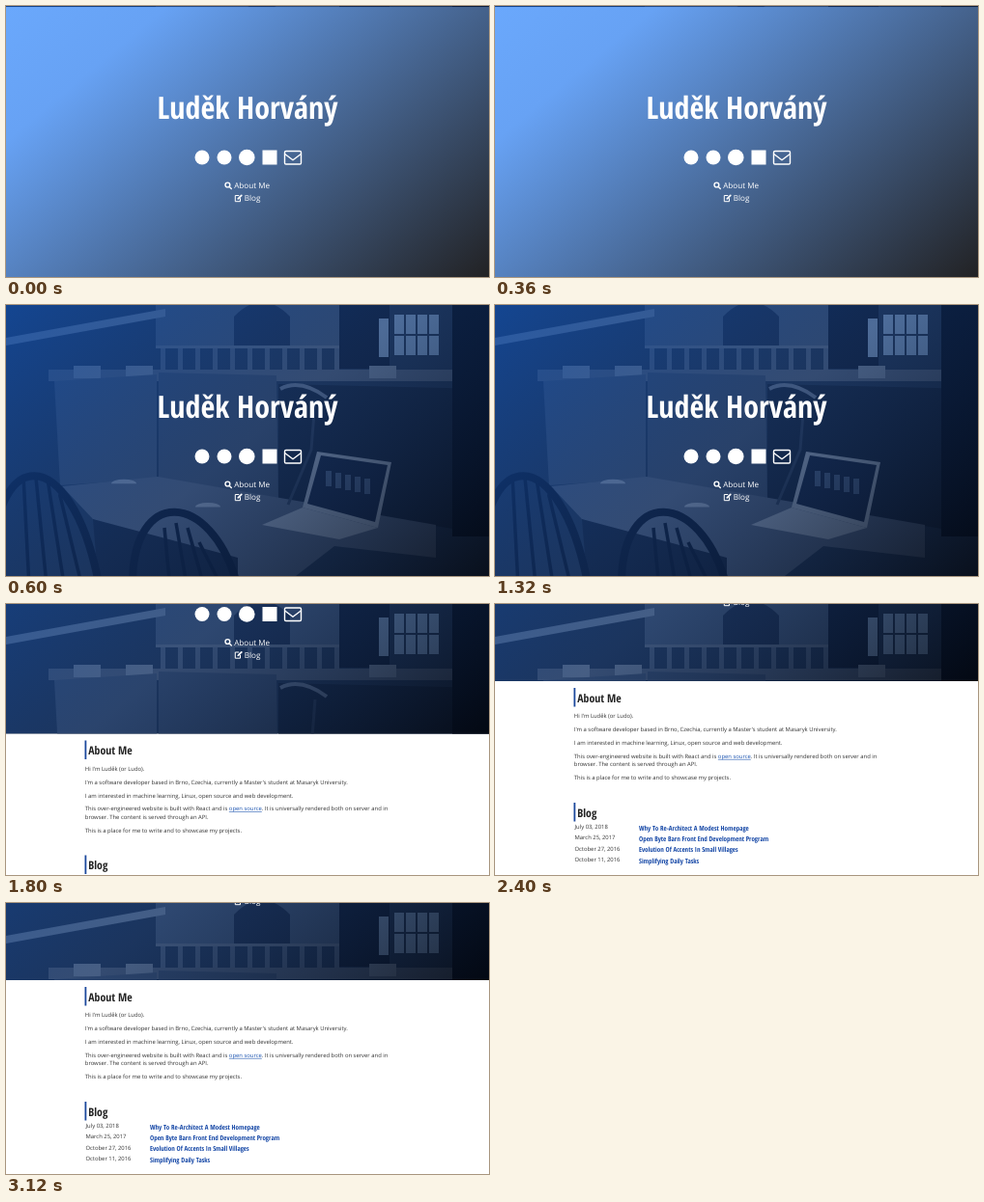
Animation, 500 px wide and 281 px high, one loop 3.6 s. Source, as an HTML page with a canvas:

```html
<!DOCTYPE html>
<html lang="en">
<head>
<meta charset="utf-8">
<title>Personal page</title>
<style>
  html, body { margin: 0; width: 100%; height: 100%; overflow: hidden; background: #fff; }
  canvas, svg { position: absolute; left: 0; top: 0; width: 100%; height: 100%; display: block; }
  text { font-family: "Open Sans", sans-serif; text-rendering: geometricPrecision; white-space: pre; }
  .cond { font-family: "Open Sans Condensed", "Open Sans", sans-serif; font-stretch: 75%; font-weight: 700; }
  .name { font-size: 32px; fill: #fff; text-anchor: middle; }
  .nav { font-size: 8.15px; fill: #fff; }
  .head { font-size: 11.8px; fill: #222; }
  .body { font-size: 5.88px; fill: #333; }
  .post { font-size: 7px; fill: #1547a6; }
  .link { fill: #1d55b0; text-decoration: underline; }
  .line { fill: none; stroke: #fff; stroke-width: 1.4; stroke-linejoin: round; stroke-linecap: round; }
</style>
</head>
<body>
<canvas id="view" width="500" height="281"></canvas>
<svg viewBox="0 0 500 281" preserveAspectRatio="none">
  <g id="page">
    <text class="cond name" x="250" y="116.5">Luděk Horváný</text>
    <g fill="#fff">
      <circle cx="203" cy="157" r="7.5"/>
      <circle cx="226" cy="157" r="7.5"/>
      <circle cx="249.3" cy="157" r="8.3"/>
      <rect x="265.5" y="149.5" width="15" height="15"/>
    </g>
    <g class="line">
      <rect x="288.500" y="150.500" width="17" height="13.500" rx="1.300"/>
      <path d="M288.700 153.500l8.300 6.200 8.300 -6.200"/>
      <circle cx="229.400" cy="185.500" r="2.400"/>
      <path d="M231.300 187.400l2 2"/>
      <path stroke-width="1" d="M242.500 199.600v3.100h-5.200v-6.200h3.500"/>
      <path stroke-width="1.700" d="M240.300 199.800l3.500 -3.500"/>
    </g>
    <text class="nav" x="236.200" y="189">About Me</text>
    <text class="nav" x="246.800" y="202">Blog</text>
  </g>
</svg>
<script>
const W = 500, H = 281, LOOP = 3600;
const ctx = document.getElementById('view').getContext('2d');
const page = document.getElementById('page');

// Text below the hero

function add(tag, attrs, str = '', parent = page) {
  const el = document.createElementNS('http://www.w3.org/2000/svg', tag);
  for (const key in attrs) el.setAttribute(key, attrs[key]);
  el.textContent = str;
  parent.append(el);
  return el;
}
function section(y, title) {
  add('rect', { x: 81.5, y: y - 14.5, width: 1.8, height: 19.5, fill: '#1b489c' });
  add('text', { class: 'cond head', x: 85.3, y }, title);
}

const about = [
  "Hi I'm Luděk (or Ludo).",
  "I'm a software developer based in Brno, Czechia, currently a Master's student at Masaryk University.",
  'I am interested in machine learning, Linux, open source and web development.',
  'This over-engineered website is built with React and is [open source]. It is universally rendered both on server and in\n' +
    'browser. The content is served through an API.',
  'This is a place for me to write and to showcase my projects.'
];
const posts = [
  ['July 03, 2018', 'Why To Re-Architect A Modest Homepage'],
  ['March 25, 2017', 'Open Byte Barn Front End Development Program'],
  ['October 27, 2016', 'Evolution Of Accents In Small Villages'],
  ['October 11, 2016', 'Simplifying Daily Tasks']
];

section(302.5, 'About Me');
let y = 319.2;
for (const para of about) {
  for (const row of para.split('\n')) {
    const el = add('text', { class: 'body', x: 81.8, y });
    row.split(/[[\]]/).forEach((part, i) => add('tspan', { class: i % 2 ? 'link' : '' }, part, el));
    y += 8.25;
  }
  y += 5.65;
}
section(421.5, 'Blog');
posts.forEach(([date, title], i) => {
  add('text', { class: 'body', x: 82.5, y: 434 + i * 11.35 }, date);
  add('text', { class: 'cond post', x: 149, y: 435.6 + i * 11.35 }, title);
});

// Hero background

// Linear gradient across the hero, running at 140 degrees as in CSS
function slope(...stops) {
  const a = 140 * Math.PI / 180, s = Math.sin(a), c = -Math.cos(a);
  const half = (W * s + H * c) / 2;
  const g = ctx.createLinearGradient(W / 2 - s * half, H / 2 - c * half, W / 2 + s * half, H / 2 + c * half);
  for (const [at, color] of stops) g.addColorStop(at, color);
  return g;
}
function rect(color, x, y, w, h) {
  ctx.fillStyle = color;
  ctx.fillRect(x, y, w, h);
}
function shape(color, d) {
  ctx.fillStyle = color;
  ctx.fill(new Path2D(d));
}
function stroke(color, width, d) {
  ctx.strokeStyle = color;
  ctx.lineWidth = width;
  ctx.stroke(new Path2D(d));
}

const blank = slope([0, '#6aa8fc'], [.2, '#67a2f4'], [1, '#222224']);
const tint = slope([0, 'rgba(14,72,160,.8)'], [.5, 'rgba(16,48,100,.6)'], [1, 'rgba(3,8,18,.85)']);

// Spindle-back chair: a hoop with rods fanning out to the floor
function chair(x, top, w) {
  const color = '#0c1528', low = H + 8;
  stroke(color, 8, `M${x - w / 2} ${low}C${x - w / 2} ${top - 24} ${x + w / 4} ${top - 20} ${x + w / 2} ${low}`);
  for (let i = -1; i < 3; i++) {
    const rod = x - w / 12 + i * w / 9;
    stroke(color, 3.5, `M${rod} ${top + 14 + i * i * 5}L${rod + (i + 2) * w / 20} ${low}`);
  }
}

function room() {
  rect('#2c3c55', 0, 0, W, H);
  // back wall, balcony and windows
  rect('#5a6a82', 155, 0, 190, 42);
  shape('#93a3b8', 'M0 34L165 4V12L0 42Z');
  shape('#26324a', 'M236 42V12Q265 -18 294 12V42Z');
  rect('#7c8798', 155, 42, 205, 3);
  for (let x = 160; x < 355; x += 18) rect('#66748a', x, 45, 5, 23);
  rect('#141c2e', 345, 0, 52, 66);
  rect('#a9c4e4', 386, 14, 10, 40);
  for (let i = 0; i < 8; i++) rect('#a9c8ec', 402 + i % 4 * 12, i < 4 ? 10 : 32, 10, 20);
  // shelf with boxes, then the partitions
  rect('#6a7486', 44, 67, 456, 12);
  for (const x of [70, 124, 376]) rect('#98a3b3', x, 63, 28, 13);
  shape('#53627a', 'M50 79L156 72V180L56 187Z');
  shape('#4d5b72', 'M158 70L280 73L282 206L158 190Z');
  shape('#1c2638', 'M282 82L500 87V238L282 203Z');
  rect('#060a14', 462, 0, 38, 240);
  // desk
  shape('#68748a', 'M58 188L157 178L445 228V262L340 250L300 281H205L90 222Z');
  shape('#1a2438', 'M90 222L240 262V281H95Z');
  // lamp, mice and laptop
  stroke('#8591a5', 4, 'M284 87Q305 76 332 96');
  stroke('#3a465c', 3, 'M320 99L316 150L292 207');
  for (const x of [122, 209]) shape('#b6c0d0', `M${x - 13} ${x * .28 + 151}a13 4.500 0 0 1 26 0z`);
  shape('#c9d2de', 'M322 152L399 163L385 231L307 210Z');
  shape('#1b2640', 'M326 156L395 166L382 225L312 206Z');
  for (let i = 0; i < 5; i++) rect('#5e7396', 331 + i * 10, 172 + i * 2, 6, 16);
  shape('#c3ccd9', 'M265 228L307 210L385 231L345 243Z');
  chair(40, 162, 112);
  chair(185, 212, 108);
}

function draw(now) {
  const t = now % LOOP;
  const scroll = t < 1800 ? 0 : t < 2400 ? 146.5 : 201;
  rect('#fff', 0, 0, W, H);
  ctx.save();
  ctx.beginPath();
  ctx.rect(0, 0, W, H - scroll);
  ctx.clip();
  // The photo stays fixed while its tint scrolls; it shows above the blank hero as a thin strip
  room();
  ctx.translate(0, -scroll);
  rect(tint, 0, 0, W, H);
  if (t < 600) rect(blank, 0, 1, W, H);
  ctx.restore();
  page.setAttribute('transform', `translate(0 ${-scroll})`);
}

const start = performance.now();
function tick() {
  draw(performance.now() - start);
  requestAnimationFrame(tick);
}
tick();
</script>
</body>
</html>
```
